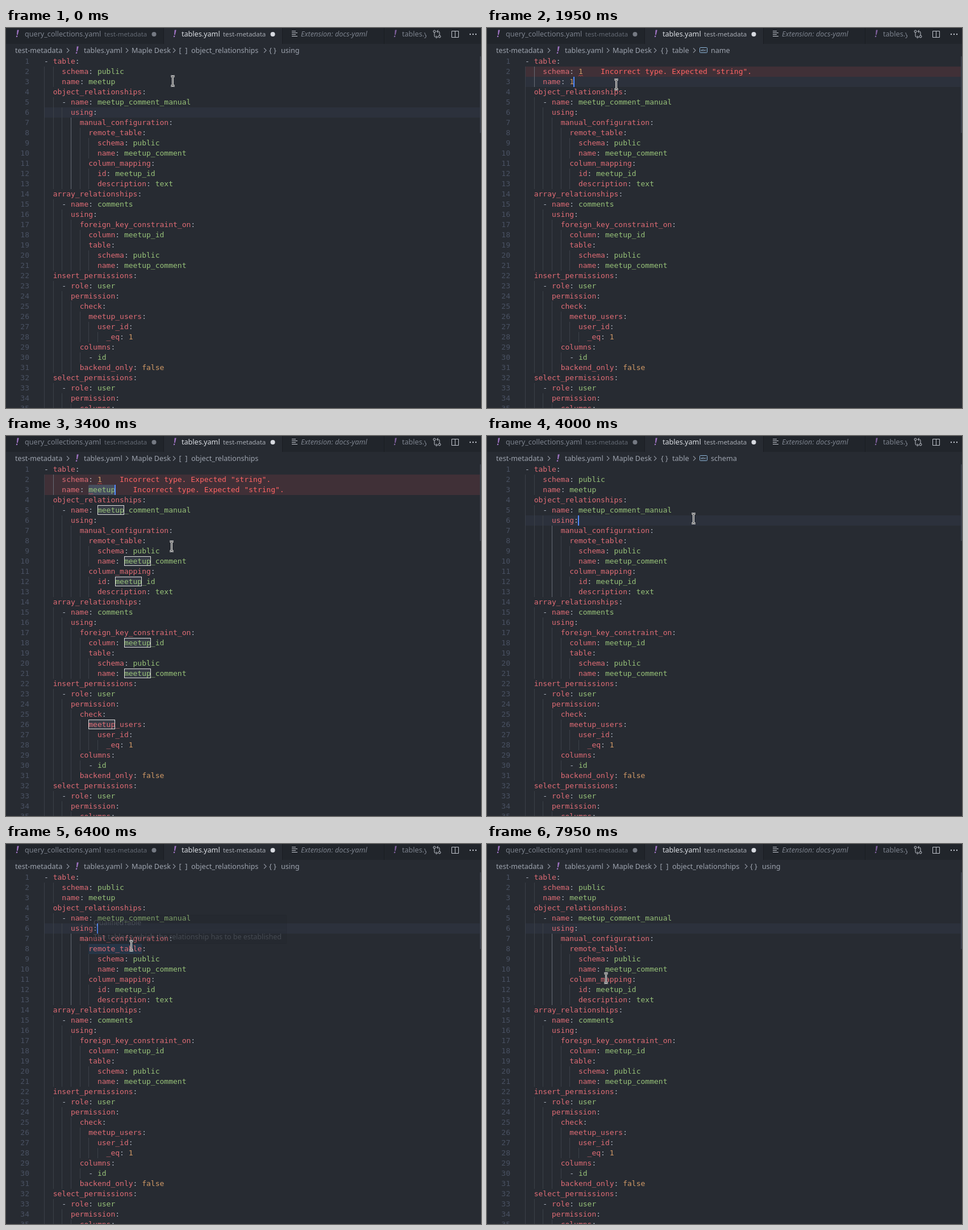
Animation, 836 px wide and 670 px high, one loop 8000 ms. Source, as an HTML page:

```html
<!DOCTYPE html>
<html lang="en">
<head>
<meta charset="utf-8">
<title>YAML schema checks</title>
<style>
html, body { margin: 0; width: 100%; height: 100%; overflow: hidden; background: #272b32; }
svg { display: block; width: 836px; height: 670px; }
text { white-space: pre; }
.ui { font: 12.6px "Noto Sans", "Open Sans", sans-serif; fill: #9da3ae; }
.small { font-size: 11.4px; }
.code { font: 13px "DejaVu Sans Mono", monospace; fill: #abb2bf; }
.num { fill: #495162; text-anchor: end; }
.key { fill: #e06c75; }
.str { fill: #98c379; }
.lit { fill: #d19a66; }
.err { fill: #ff6464; }
.guide { fill: #3b4048; }
.guide.on { fill: #666b74; }
.match { fill: #373c46; stroke: #ddd; }
.line { fill: none; stroke: #c0c4cc; }
.tip { font-size: 12.5px; fill: #abb2bf; }
</style>
</head>
<body>
<svg id="stage" viewBox="0 0 836 670"></svg>
<script>
const NS = 'http://www.w3.org/2000/svg';
const LEFT = 67, CHAR = 7.826, ROW = 18, TOP = 50, BASE = 13, LOOP = 8000;
const stage = document.getElementById('stage');

const source = `- table:
    schema: public
    name: meetup
  object_relationships:
    - name: meetup_comment_manual
      using:
        manual_configuration:
          remote_table:
            schema: public
            name: meetup_comment
          column_mapping:
            id: meetup_id
            description: text
  array_relationships:
    - name: comments
      using:
        foreign_key_constraint_on:
          column: meetup_id
          table:
            schema: public
            name: meetup_comment
  insert_permissions:
    - role: user
      permission:
        check:
          meetup_users:
            user_id:
              _eq: 1
        columns:
          - id
        backend_only: false
  select_permissions:
    - role: user
      permission:
        columns:`.split('\n');

function add(parent, tag, attrs = {}, content) {
  const el = document.createElementNS(NS, tag);
  for (const k in attrs) el.setAttribute(k, attrs[k]);
  if (content !== undefined) el.textContent = content;
  parent.appendChild(el);
  return el;
}
const group = (parent = stage) => add(parent, 'g');
const rect = (p, x, y, width, height, attrs) => add(p, 'rect', { x, y, width, height, ...attrs });
const path = (p, d, attrs) => add(p, 'path', { d, ...attrs });
const label = (p, x, y, str, cls = 'ui', attrs) => add(p, 'text', { x, y, class: cls, ...attrs }, str);
const colX = col => LEFT + col * CHAR;
const rowY = row => TOP + (row - 1) * ROW;
const show = (el, on) => el.setAttribute('visibility', on ? 'visible' : 'hidden');

// Row backgrounds
const rowMark = rect(stage, LEFT, 0, 767, ROW, { fill: '#2c313c' });
const errorBands = [2, 3].map(r => rect(stage, LEFT, rowY(r), 767, ROW, { fill: '#e45554', 'fill-opacity': .13 }));

// Indent guides
source.forEach((line, i) => {
  for (let c = 0; c < line.search(/\S/); c += 2)
    rect(stage, Math.round(colX(c)), rowY(i + 1), 1, ROW, { class: 'guide' });
});
const activeGuides = {
  table: rect(stage, 83, rowY(2), 1, ROW * 2, { class: 'guide on' }),
  using: rect(stage, 114, rowY(7), 1, ROW * 7, { class: 'guide on' })
};

// Selected word and its other occurrences
function selection(word, ownRow) {
  const g = group();
  source.forEach((line, i) => {
    const col = line.indexOf(word), row = i + 1;
    if (col < 0) return;
    const x = Math.round(colX(col)), w = Math.round(word.length * CHAR);
    if (row === ownRow) rect(g, x, rowY(row), w, ROW, { fill: '#474e5e', rx: 2 });
    else rect(g, x + .5, rowY(row) + .5, w - 1, ROW - 2, { class: 'match' });
  });
  return g;
}
const selections = { public: selection('public', 2), meetup: selection('meetup', 3) };

const hover = (row, col, len) =>
  rect(stage, colX(col), rowY(row), len * CHAR, ROW, { fill: '#264f78', 'fill-opacity': .3 });
const hovers = { manual: hover(7, 8, 20), remote: hover(8, 10, 12) };

// Code
const valueClass = v => /^(\d+|true|false)$/.test(v) ? 'lit' : 'str';
const values = source.map((line, i) => {
  const [, lead, key, colon, value] = line.match(/^(\s*(?:- )?)(?:(\w+)(:\s?))?(.*)$/);
  const y = rowY(i + 1) + BASE;
  label(stage, 41, y, i + 1, 'code num');
  const text = label(stage, LEFT, y, '', 'code');
  add(text, 'tspan', {}, lead);
  if (key) {
    add(text, 'tspan', { class: 'key' }, key);
    add(text, 'tspan', {}, colon);
  }
  return add(text, 'tspan', { class: valueClass(value) }, value);
});
function setValue(row, v) {
  const el = values[row - 1];
  if (el.textContent === v) return;
  el.textContent = v;
  el.setAttribute('class', valueClass(v));
}

const errors = [[2, 12], [3, 10]].map(([row, col]) => {
  const g = group(), y = rowY(row);
  const text = label(g, 0, y + BASE, 'Incorrect type. Expected "string".', 'code err');
  path(g, `M${colX(col)} ${y + 17}l2 -2 2 2 2 -2 2 2`, { fill: 'none', stroke: '#e0504f', 'stroke-width': .8 });
  return { g, text, col };
});

const caret = rect(stage, 0, 0, 2, ROW, { fill: '#528bff' });
rect(stage, 834, 50, 2, 135, { fill: '#3b404a' });

// Tabs
const bang = (p, x, y, opacity = 1) =>
  path(p, `M${x - .3} ${y - 6.5}h3l-2 8.5h-1.7zM${x - 1.8} ${y + 3.6}h2.2l-.5 2.3h-2.2z`, { fill: '#a074c4', opacity });
const dot = (x, y, r, fill) => add(stage, 'circle', { cx: x, cy: y, r, fill });

rect(stage, 0, 0, 836, 28, { fill: '#21252b' });
rect(stage, 278, 0, 208, 28, { fill: '#272b32' });
for (const x of [277, 486, 665]) rect(stage, x, 0, 1, 28, { fill: '#1a1d22' });

bang(stage, 20, 10);
label(stage, 33, 15, 'query_collections.yaml', 'ui', { style: 'fill:#7c828d' });
label(stage, 173, 15, 'test-metadata', 'ui small', { style: 'fill:#646a74' });
dot(260.5, 11, 4, '#757a83');
bang(stage, 297, 10);
label(stage, 309, 15, 'tables.yaml', 'ui', { style: 'fill:#dcdfe4' });
label(stage, 382, 15, 'test-metadata', 'ui small', { style: 'fill:#a7abb3' });
dot(469.5, 11, 4, '#d7dae0');
path(stage, 'M503 5.5h7M503 8.5h10M503 11.5h7M503 14.5h10', { class: 'line' });
label(stage, 519, 15, 'Extension: docs-yaml', 'ui', { style: 'fill:#7c828d;font-style:italic' });
bang(stage, 685, 10, .75);
const clip = add(add(stage, 'defs'), 'clipPath', { id: 'tabEdge' });
rect(clip, 690, 0, 50, 28);
label(stage, 697, 15, 'tables.yaml', 'ui', { style: 'fill:#7c828d', 'clip-path': 'url(#tabEdge)' });

// Toolbar icons
const tools = add(stage, 'g', { class: 'line' });
path(tools, 'M754 8v6q0 2 2 2h3M757 13.5l2.5 2.5 -2.5 2.5M763 13v-5q0 -2 -2 -2h-3M760.5 3.5l-2.5 2.5 2.5 2.5');
add(tools, 'circle', { cx: 754, cy: 6, r: 2 });
add(tools, 'circle', { cx: 763, cy: 15, r: 2 });
path(tools, 'M784.5 5.5h12v11h-12zM790.5 5.5v11');
for (const x of [817, 822, 827]) dot(x, 11, 1.2, '#c0c4cc');

// Breadcrumbs
const chevron = (p, x) => path(p, `M${x - 2} 35.5l4 4 -4 4`, { fill: 'none', stroke: '#8b919c', 'stroke-width': 1.1 });
label(stage, 16, 44, 'test-metadata');
chevron(stage, 109);
bang(stage, 125, 39);
label(stage, 137, 44, 'tables.yaml');
chevron(stage, 213);
label(stage, 221, 44, 'Maple Desk');
chevron(stage, 296);

const braces = (p, x) => label(p, x, 44, '{ }');
function arrayCrumb(last) {
  const g = group();
  label(g, 304.5, 44, '[  ]');
  label(g, 326, 44, 'object_relationships');
  if (last) {
    chevron(g, 456);
    braces(g, 463);
    label(g, 484, 44, last);
  }
  return g;
}
function tableCrumb(last) {
  const g = group();
  braces(g, 306);
  label(g, 326, 44, 'table');
  chevron(g, 365);
  rect(g, 374.5, 34.5, 13, 9, { fill: 'none', stroke: '#8fb8dc', rx: 1 });
  label(g, 376, 41.2, 'abc', 'ui', { style: 'font-size:6px;fill:#a9cdec' });
  label(g, 394, 44, last);
  return g;
}
const crumbs = {
  using: arrayCrumb('using'), list: arrayCrumb(),
  schema: tableCrumb('schema'), name: tableCrumb('name')
};

// Hover cards
function card(x, y, w, title, body) {
  const g = group();
  rect(g, x + .5, y + .5, w - 1, 50, { fill: '#21252b', stroke: '#181a1f' });
  label(g, x + 9, y + 18, title, 'ui tip');
  rect(g, x + 1, y + 26, w - 2, 1, { fill: '#2d3138' });
  label(g, x + 9, y + 43, body, 'ui tip');
  return g;
}
const cards = {
  manual: card(130, 107, 241, 'ObjRelUsingManualMapping', 'Manual mapping of table and columns'),
  remote: card(145, 125, 349, 'QualifiedTable', 'The table to which the relationship has to be established')
};

// Pointer
const pointer = group();
const beam = 'M-3.5 -8.5h2.5l1 1 1 -1h2.5M0 -7.5v15M-3.5 8.5h2.5l1 -1 1 1h2.5';
path(pointer, beam, { fill: 'none', stroke: '#fff', 'stroke-width': 3 });
path(pointer, beam, { fill: 'none', stroke: '#111' });

// Each step changes part of the editor state
const steps = [
  [0, { row: 6, caret: null, guide: 'using', v2: 'public', v3: 'meetup', sel: '', err2: false, err3: false,
        crumb: 'using', card: '', fade: 0 }],
  [600, { row: 2, caret: 18, guide: 'table' }],
  [750, { sel: 'public' }],
  [900, { v2: '1', sel: '', caret: 13 }],
  [1050, { crumb: 'schema' }],
  [1650, { row: 3, sel: 'meetup', caret: 16 }],
  [1850, { v3: '1', sel: '', caret: 11 }],
  [1900, { crumb: 'name' }],
  [1950, { err2: true }],
  [2550, { err3: true }],
  [2650, { row: 4, caret: 23, guide: '' }],
  [2800, { crumb: 'list' }],
  [3400, { row: 3, v3: 'meetup', sel: 'meetup', caret: 16, guide: 'table' }],
  [3500, { row: 2, v2: 'public', sel: '', caret: 18 }],
  [3550, { sel: 'public' }],
  [3700, { err2: false, err3: false, crumb: 'schema' }],
  [3950, { row: 6, sel: '', caret: 12, guide: 'using' }],
  [4200, { crumb: 'using' }],
  [4950, { card: 'manual', fade: .4 }],
  [5050, { fade: 1 }],
  [5900, { card: '' }],
  [6400, { card: 'remote', fade: .22 }],
  [6450, { fade: .6 }],
  [6500, { fade: 1 }],
  [7400, { card: '' }],
  [7850, { caret: null }]
];

// Pointer stops: time, x, y
const stops = [
  [0, 293, 93], [200, 232, 52], [400, 186, 63], [550, 186, 63], [600, 190, 76], [900, 190, 76],
  [1200, 174, 97], [1850, 174, 97], [1950, 227, 99], [2500, 295, 113], [2700, 295, 113],
  [3400, 291, 194], [3500, 291, 194], [3950, 363, 145], [4150, 363, 145], [4650, 216, 170],
  [5850, 216, 170], [6200, 220, 179], [7350, 220, 179], [7950, 209, 236], [LOOP, 209, 236]
];

function pointerAt(t) {
  const i = stops.findIndex(s => s[0] > t);
  const [t0, x0, y0] = stops[i - 1], [t1, x1, y1] = stops[i];
  const k = (t - t0) / (t1 - t0), e = k * k * (3 - 2 * k);
  return [x0 + (x1 - x0) * e, y0 + (y1 - y0) * e].map(v => Math.round(v) + .5);
}
const pick = (set, name) => { for (const k in set) show(set[k], k === name); };

function render(t) {
  const s = Object.assign({}, ...steps.filter(([at]) => at <= t).map(([, change]) => change));
  show(rowMark, !s.sel);
  rowMark.setAttribute('y', rowY(s.row));
  show(caret, s.caret !== null);
  caret.setAttribute('x', Math.round(colX(s.caret || 0)) - 1);
  caret.setAttribute('y', rowY(s.row));
  setValue(2, s.v2);
  setValue(3, s.v3);
  [[s.err2, s.v2], [s.err3, s.v3]].forEach(([on, v], i) => {
    const { g, text, col } = errors[i];
    show(g, on);
    show(errorBands[i], on);
    text.setAttribute('x', colX(col + v.length + 4));
  });
  pick(activeGuides, s.guide);
  pick(selections, s.sel);
  pick(crumbs, s.crumb);
  pick(hovers, s.card);
  pick(cards, s.card);
  if (s.card) cards[s.card].setAttribute('opacity', s.fade);
  pointer.setAttribute('transform', `translate(${pointerAt(t)})`);
}

function tick() {
  render(Math.floor(performance.now() % LOOP / 50) * 50);
  requestAnimationFrame(tick);
}
tick();
</script>
</body>
</html>
```
